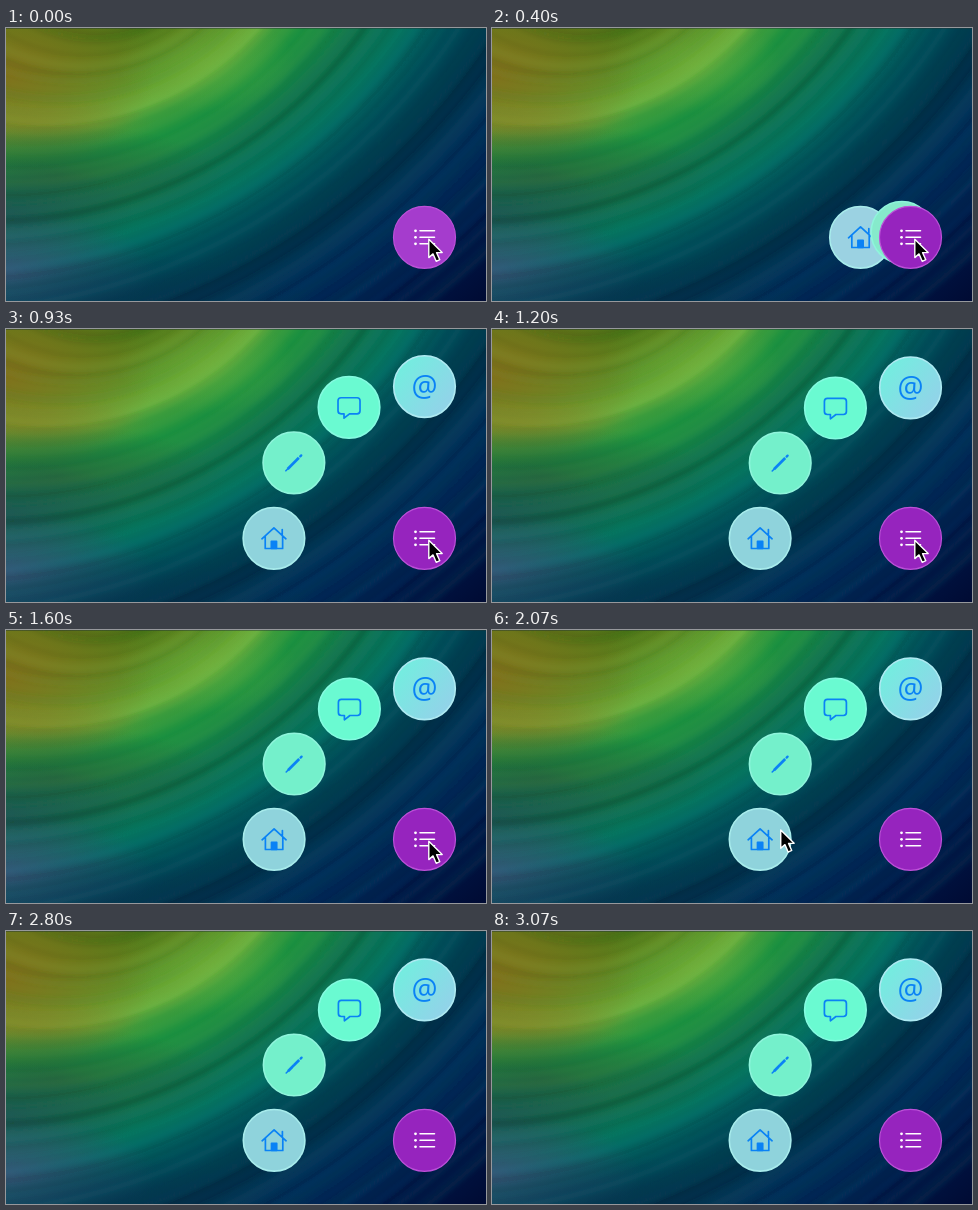
An HTML page for the animation above (3.14 s loop, 480 by 273 pixels).

```html
<!DOCTYPE html>
<html lang="en">
<head>
<meta charset="utf-8">
<title>Radial menu</title>
<style>
  html, body { margin: 0; width: 100%; height: 100%; overflow: hidden; background: #012a50; }
  svg { display: block; width: 100vw; height: 100vh; }
  .icon { fill: none; stroke: #0a82f5; stroke-width: 1.7; stroke-linejoin: round; stroke-linecap: round; }
  text { font: 29px "Open Sans", "Noto Sans", sans-serif; fill: #0a82f5; text-anchor: middle; }
</style>
</head>
<body>
<svg viewBox="0 0 480 273" preserveAspectRatio="none">
  <defs>
    <radialGradient id="sweep" gradientUnits="userSpaceOnUse"></radialGradient>
    <filter id="soft" filterUnits="userSpaceOnUse" x="-10" y="-10" width="500" height="293">
      <feGaussianBlur stdDeviation="2"/>
    </filter>
    <linearGradient id="mention" x1="0" y1="0.1" x2="1" y2="0.9">
      <stop id="mentionA"/><stop id="mentionB" offset="1"/>
    </linearGradient>
  </defs>
  <rect width="480" height="273" fill="url(#sweep)"/>
  <g id="glows"></g>
  <g id="streaks" fill="none" filter="url(#soft)"></g>
  <path d="M0 .5H480" stroke="#233" stroke-opacity=".45"/>

  <g id="items" stroke-width="1.6">
    <g><circle r="30.8"/>
      <g class="icon"><path d="M-12 .5L0-10.5L12 .5M-8.7-2V10.2H8.7V-2M8.3-4V-8.8"/><path d="M-2.6 10V3H2.6V10Z" fill="#0a82f5"/></g></g>
    <g><circle r="30.8"/>
      <g class="icon"><path d="M-6.2 6.2L5-5" stroke-width="2.7" stroke-linecap="butt"/><path d="M-8 8L-6 6" stroke-width="1.6"/><path d="M6.4-6.4L7.4-7.4" stroke-width="2.3"/></g></g>
    <g><circle r="30.8"/>
      <path class="icon" d="M-8-9.6H8Q11-9.6 11-6.6V3.5Q11 6.5 8 6.5H.5L-5 10.8V6.5H-8Q-11 6.5-11 3.5V-6.6Q-11-9.6-8-9.6Z"/></g>
    <g><circle r="30.8" fill="url(#mention)"/><text y="9.2">@</text></g>
  </g>

  <g transform="translate(418.5 209.3)">
    <circle id="menu" r="31" stroke="#bd50d8" stroke-width="1.2"/>
    <path d="M-4.5-6.5H10M-4.5 0H10M-4.5 6.5H10" stroke="#fff" stroke-width="1.6" stroke-linecap="round"/>
    <g fill="#fff"><circle cx="-9" cy="-6.5" r="1.4"/><circle cx="-9" r="1.4"/><circle cx="-9" cy="6.5" r="1.4"/></g>
  </g>
  <path id="cursor" d="M0 0V18.3L4.2 14.6L7.4 22L11 20.4L7.8 13.3H13.4Z" fill="#000" stroke="#fff" stroke-width="1.4" stroke-linejoin="round"/>
</svg>
<script>
const LOOP = 3140;
const HOME = [418.5, 209.3];
const $ = id => document.getElementById(id);
const clamp = v => Math.max(0, Math.min(1, v));
const mix = (a, b, k) => a.map((v, i) => v + (b[i] - v) * k);
const rgb = c => `rgb(${c.map(Math.round)})`;

function add(parent, tag, attrs) {
  const el = document.createElementNS("http://www.w3.org/2000/svg", tag);
  for (const key in attrs) el.setAttribute(key, attrs[key]);
  return parent.appendChild(el);
}

// The wallpaper is a family of nested circles whose centre drifts with the radius.
const center = r => [40 - 0.327 * (r - 285), -190 - 0.449 * (r - 285)];
const R0 = 110, R1 = 1070;

function paintWallpaper() {
  const sweep = $("sweep"), [fx, fy] = center(R0), [cx, cy] = center(R1);
  for (const [k, v] of Object.entries({ fx, fy, cx, cy, fr: R0, r: R1 })) sweep.setAttribute(k, v);
  const stops = {
    110: "#4f7a18", 170: "#587f1c", 215: "#5c942a", 250: "#66a632", 285: "#6cb440", 312: "#3c9c3c",
    360: "#1a9040", 435: "#127c46", 490: "#08704f", 530: "#057560", 570: "#02605f",
    610: "#004c58", 660: "#003a4c", 720: "#002f4c", 800: "#002c5a", 880: "#002253", 960: "#001443", 1070: "#000b34"
  };
  for (const r in stops) add(sweep, "stop", { offset: (r - R0) / (R1 - R0), "stop-color": stops[r] });

  const glow = (x, y, rx, ry, color, alpha) => {
    const id = "glow" + $("glows").childElementCount;
    const grad = add(document.querySelector("defs"), "radialGradient", { id });
    add(grad, "stop", { "stop-color": color, "stop-opacity": alpha });
    add(grad, "stop", { offset: 0.5, "stop-color": color, "stop-opacity": alpha * 0.5 });
    add(grad, "stop", { offset: 1, "stop-color": color, "stop-opacity": 0 });
    add($("glows"), "ellipse", { cx: x, cy: y, rx, ry, fill: `url(#${id})` });
  };
  glow(0, 45, 150, 100, "#84701a", 0.95);
  glow(20, 95, 130, 26, "#8c8424", 0.5);
  glow(50, 148, 170, 52, "#205a38", 0.75);
  glow(0, 185, 130, 55, "#1c4a4c", 0.75);
  glow(0, 243, 150, 60, "#3c5378", 0.9);
  glow(130, 290, 190, 65, "#052f4c", 0.85);
  glow(200, 35, 90, 50, "#78bc40", 0.35);

  let seed = 11;
  const rand = () => (seed = (seed * 16807) % 2147483647) / 2147483647;
  for (let i = 0; i < 130; i++) {
    const r = 120 + rand() * 880, [x, y] = center(r);
    add($("streaks"), "circle", {
      cx: x, cy: y, r,
      stroke: rand() < 0.5 ? "#002a24" : r < 400 ? "#b0d460" : "#3a98a0",
      "stroke-opacity": 0.02 + rand() * 0.05,
      "stroke-width": 2 + rand() * 9
    });
  }
}

const items = [
  { to: [268.1, 209.3], early: [155, 210, 226], late: [143, 211, 220], rim: "#a8ecec" },
  { to: [288.2, 134], early: [134, 234, 203], late: [116, 240, 203], rim: "#8ff5dc" },
  { to: [343.4, 79], early: [133, 230, 198], late: [106, 250, 209], rim: "#84fbe0" },
  { to: [418.5, 58.8], early: [152, 206, 228], late: [112, 240, 222], rim: "#aeeaf2" }
];
items.forEach((item, i) => {
  item.el = $("items").children[i];
  item.disc = item.el.querySelector("circle");
  item.disc.setAttribute("stroke", item.rim);
});

function spring(ms) {
  if (ms <= 0) return 0;
  const x = ms * 0.014, zeta = 0.82, w = Math.sqrt(1 - zeta * zeta);
  return 1 - Math.exp(-zeta * x) * (Math.cos(w * x) + zeta / w * Math.sin(w * x));
}

function draw(t) {
  items.forEach((item, i) => {
    const start = 322 + 50 * i;
    const [x, y] = mix(HOME, item.to, spring(t - start));
    item.el.setAttribute("transform", `translate(${x} ${y})`);
    item.el.setAttribute("visibility", t > start ? "visible" : "hidden");
    const tint = mix(item.early, item.late, clamp((t - 670) / 250));
    if (i < 3) item.disc.setAttribute("fill", rgb(tint));
    else {
      $("mentionA").setAttribute("stop-color", rgb(tint));
      $("mentionB").setAttribute("stop-color", "#96cfea");
    }
  });
  $("menu").setAttribute("fill", rgb(mix([165, 60, 205], [150, 36, 190], clamp((t - 150) / 250))));

  const u = Math.max(0, t - 1705) / 370;
  $("cursor").setAttribute("transform", `translate(${422.8 - 137 * u * u} ${211.3 - 11.5 * u * u})`);
}

paintWallpaper();
const begin = performance.now();
(function tick() {
  draw((performance.now() - begin) % LOOP);
  requestAnimationFrame(tick);
})();
</script>
</body>
</html>
```
